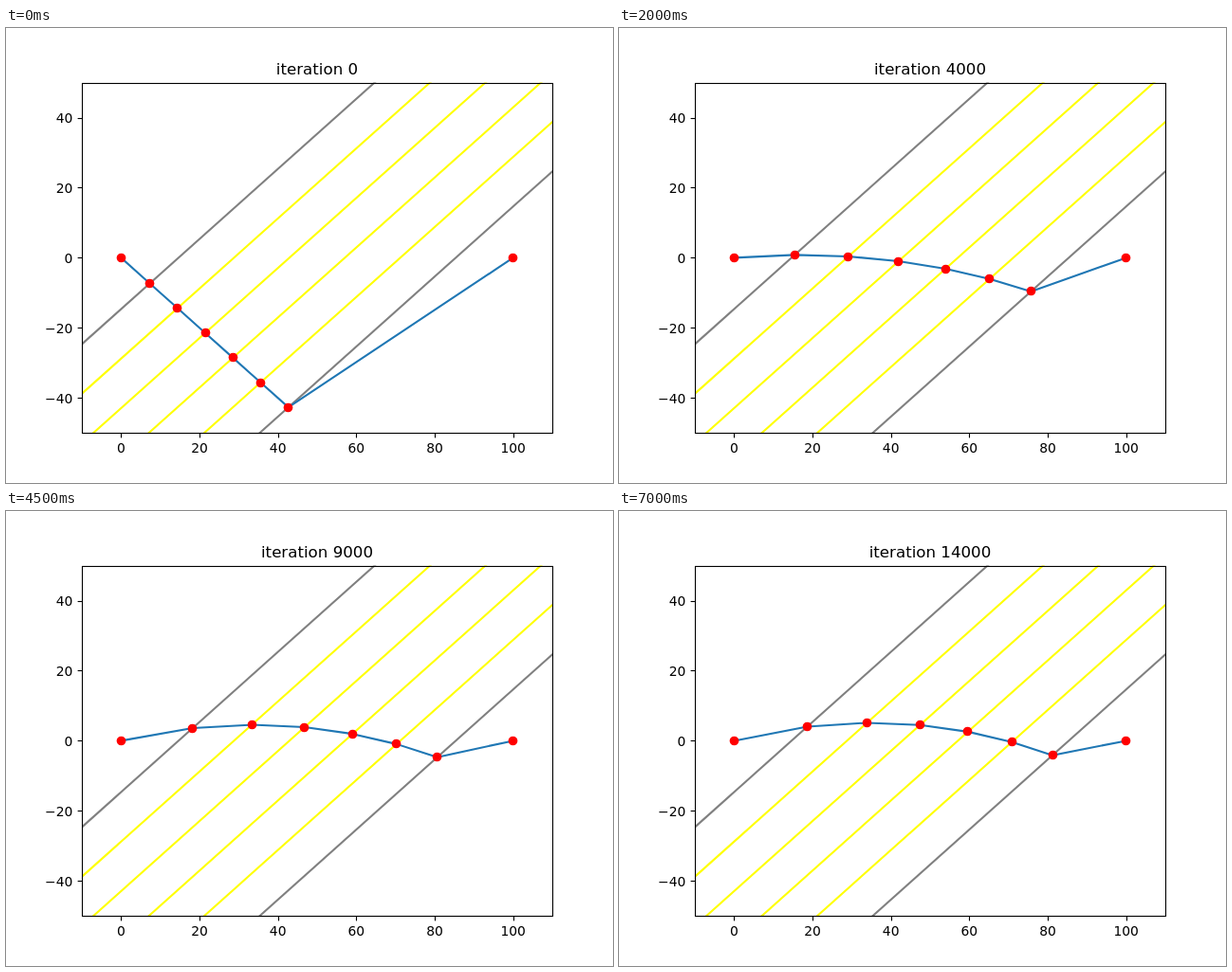
An HTML page for the animation above (7500 ms loop, 640 by 480 pixels).

```html
<!DOCTYPE html>
<html lang="en">
<head>
<meta charset="utf-8">
<title>Shortest-time path</title>
<style>
  html, body { margin: 0; width: 100%; height: 100%; overflow: hidden; background: #fff; }
  svg { display: block; }
  text { font-family: "DejaVu Sans", sans-serif; font-size: 13.89px; fill: #000; }
  #title { font-size: 16.67px; }
</style>
</head>
<body>
<svg id="plot" width="640" height="480" viewBox="0 0 640 480">
  <clipPath id="area"><rect x="80" y="57.6" width="496" height="369.6"/></clipPath>
</svg>
<script>
const STEP_MS = 500, STATES = 15, ITERATIONS = 1000, RATE = 0.1;
const BOUNDARIES = 6, THICKNESS = 10;
const SPEEDS = [1, 0.9, 0.8, 0.7, 0.6, 0.5, 1];

const svg = document.getElementById("plot");
const px = x => 80 + (x + 10) * 496 / 120;
const py = y => 57.6 + (50 - y) * 3.696;
const snap = v => Math.floor(v + 0.5) + 0.5;

function add(tag, attrs, text) {
  const el = document.createElementNS("http://www.w3.org/2000/svg", tag);
  for (const key in attrs) el.setAttribute(key, attrs[key]);
  if (text !== undefined) el.textContent = text;
  return svg.appendChild(el);
}

// Boundary i is the line y = x - offsets[i]
const offsets = Array.from({ length: BOUNDARIES },
  (_, i) => 50 + (i - (BOUNDARIES - 1) / 2) * THICKNESS * Math.SQRT2);
const edge = offsets[0] / Math.SQRT2;
const widths = SPEEDS.map((_, i) => i === 0 || i === BOUNDARIES ? edge : THICKNESS);

// Gradient descent on travel time; pos holds distances along each boundary
function descend(pos) {
  const all = [0, ...pos, 100 / Math.SQRT2];
  const slow = widths.map((w, i) => {
    const d = all[i + 1] - all[i];
    return d / Math.hypot(d, w) / SPEEDS[i];
  });
  return pos.map((p, i) => p + RATE * (slow[i + 1] - slow[i]));
}

function toPoints(pos) {
  const inner = pos.map((p, i) => {
    const x = offsets[i] / 2 + p / Math.SQRT2;
    return [px(x), py(x - offsets[i])];
  });
  return [[px(0), py(0)], ...inner, [px(100), py(0)]];
}

const states = [];
let pos = offsets.map(() => 0);
for (let s = 0; s < STATES; s++) {
  states.push(toPoints(pos));
  for (let k = 0; k < ITERATIONS; k++) pos = descend(pos);
}

offsets.forEach((c, i) => add("line", {
  x1: px(-60), y1: py(-60 - c), x2: px(160), y2: py(160 - c),
  stroke: i === 0 || i === BOUNDARIES - 1 ? "#808080" : "#ffff00",
  "stroke-width": 2.083, "clip-path": "url(#area)"
}));

const path = add("polyline", {
  fill: "none", stroke: "#1f77b4", "stroke-width": 2.083, "stroke-linejoin": "round"
});
const dots = states[0].map(() => add("circle", { r: 4.86, fill: "#ff0000" }));

const ink = { fill: "none", stroke: "#000", "stroke-width": 1.11 };
add("rect", { x: 80.5, y: 58.5, width: 496, height: 369, ...ink });
for (let v = 0; v <= 100; v += 20) {
  const x = snap(px(v));
  add("line", { x1: x, y1: 427.5, x2: x, y2: 432.4, ...ink });
  add("text", { x: px(v), y: 448, "text-anchor": "middle" }, v);
}
for (let v = -40; v <= 40; v += 20) {
  const y = snap(py(v));
  add("line", { x1: 75.6, y1: y, x2: 80.5, y2: y, ...ink });
  add("text", { x: 70.3, y: Math.round(py(v) + 5.3), "text-anchor": "end" },
    String(v).replace("-", "\u2212"));
}
const title = add("text", { id: "title", x: 328, y: 49, "text-anchor": "middle" });

let shown = -1;
function show(s) {
  if (s === shown) return;
  shown = s;
  path.setAttribute("points", states[s].join(" "));
  states[s].forEach(([x, y], i) => {
    dots[i].setAttribute("cx", Math.floor(x) + 0.5);
    dots[i].setAttribute("cy", Math.floor(y) + 0.5);
  });
  title.textContent = "iteration " + s * ITERATIONS;
}

const start = performance.now();
function tick() {
  show(Math.floor((performance.now() - start) / STEP_MS) % STATES);
  requestAnimationFrame(tick);
}
tick();
</script>
</body>
</html>
```
